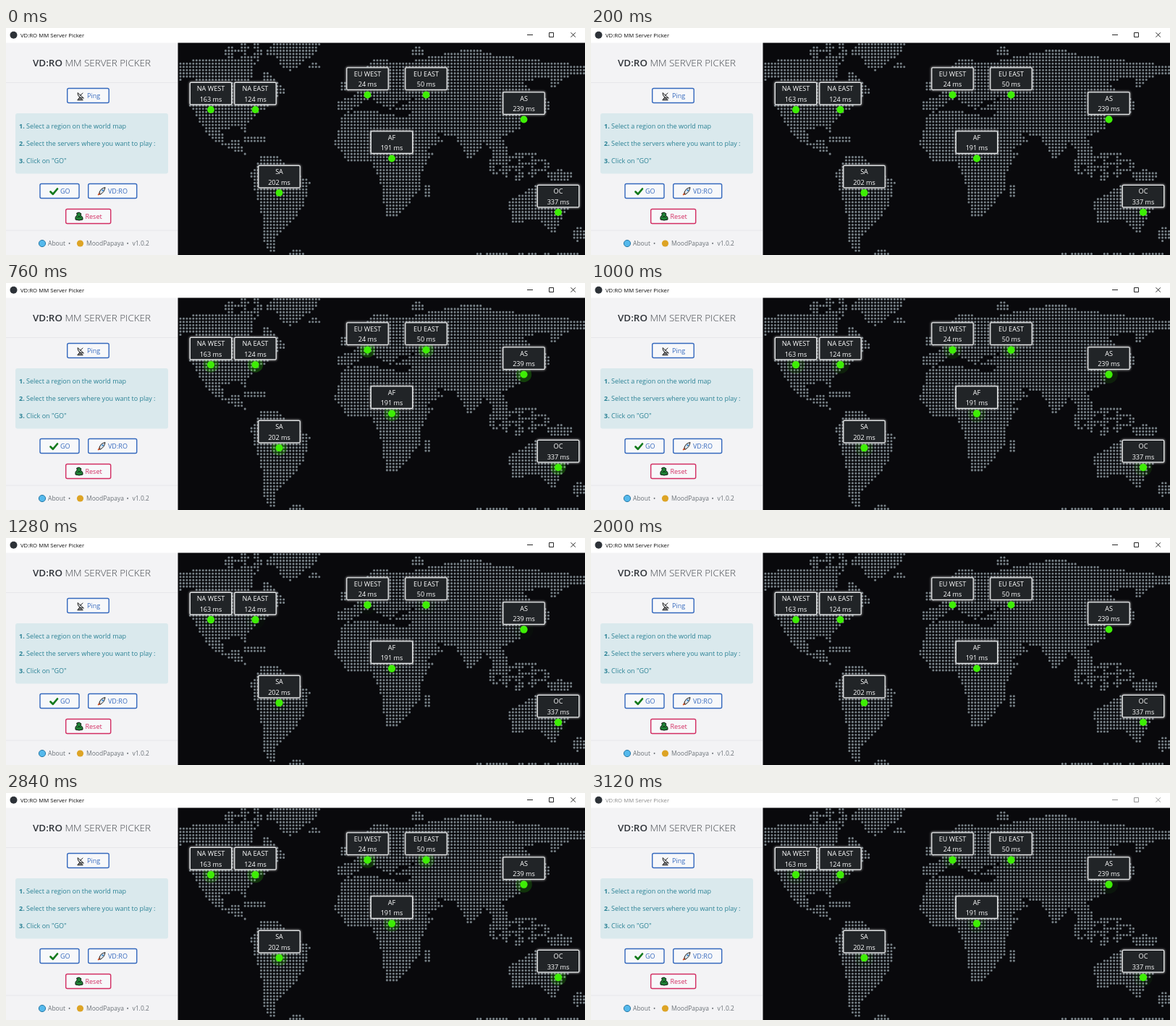
Write an HTML page that moves like this. It is 800 px wide and 314 px high and loops after 3.16 s.

```html
<!DOCTYPE html>
<html lang="en">
<head>
<meta charset="utf-8">
<title>Server Picker</title>
<style>
html, body { margin: 0; width: 100%; height: 100%; overflow: hidden; background: #09090c; }
svg { display: block; font: 9px "Open Sans", "Noto Sans", sans-serif; }
.btn rect { fill: #f7f8fa; stroke: currentColor; stroke-width: 1.4; }
.btn text { fill: currentColor; }
.label text { fill: #fff; font-size: 9.1px; font-weight: 500; text-anchor: middle; }
.foot { fill: #6c7278; font-size: 8.5px; }
.info { fill: #2b8295; }
.info tspan { font-weight: 700; }
</style>
</head>
<body>
<svg width="800" height="314" viewBox="0 0 800 314">
  <defs>
    <filter id="glow" x="-20%" y="-30%" width="140%" height="160%"><feGaussianBlur stdDeviation="1.7"/></filter>
  </defs>
  <rect width="800" height="314" fill="#09090c"/>
  <path id="land" fill="none" stroke="#757f85" stroke-width="3.1" stroke-linecap="round"/>
  <g id="servers"></g>

  <rect y="20" width="237.5" height="294" fill="#f3f3f5"/>
  <path d="M0 75.5H237M0 280H237" stroke="#e7e7ea"/>
  <text x="37" y="52.6" font-size="13.4" font-weight="300" fill="#44484d"><tspan font-weight="600" fill="#30343a">VD:RO</tspan> MM SERVER PICKER</text>
  <rect x="13" y="118" width="211" height="83.5" rx="3" fill="#dae9ed"/>
  <g class="info">
    <text x="18" y="139.2"><tspan>1.</tspan> Select a region on the world map</text>
    <text x="18" y="163"><tspan>2.</tspan> Select the servers where you want to play :</text>
    <text x="18" y="186.8"><tspan>3.</tspan> Click on "GO"</text>
  </g>
  <g id="buttons"></g>

  <!-- button icons: dish, check, rocket, bag -->
  <g stroke="#222" stroke-linejoin="round" stroke-linecap="round">
    <path d="M99 99.5l3-4 4 4z" fill="#777"/>
    <path d="M99 90q0 7 8 7zM103 93l3-3" fill="#d5d8da"/>
    <path d="M61.5 226.500l3.300 3.300 6.200-7.300" fill="none" stroke="#147a1c" stroke-width="2.700"/>
    <path d="M129 228l-2 3 3-1z" fill="#e66b23" stroke="#c7431c"/>
    <path d="M129 228q1-6 8-7.500-1 7-6.500 9.500z" fill="#dfe5ea"/>
    <circle cx="133.5" cy="224.500" r="1.300" fill="#3f8ed4" stroke="none"/>
    <path d="M98 256l3-1 3 2-1 2q4 2 3 6-5 2-10 0-1-4 2-6zM99 262q2-3 4 0" fill="#208336" stroke="#101812"/>
  </g>

  <circle cx="50" cy="298" r="4.600" fill="#55b9ec" stroke="#2878a6"/>
  <circle cx="102.500" cy="298" r="4.600" fill="#dda426"/>
  <g class="foot">
    <text x="58" y="301">About</text><text x="86" y="301">•</text>
    <text x="111" y="301">MoodPapaya</text><text x="166.500" y="301">•</text><text x="174.500" y="301">v1.0.2</text>
  </g>

  <rect width="800" height="20.500" fill="#fff"/>
  <circle cx="10.500" cy="9.800" r="5" fill="#2d3238"/>
  <g id="bar">
    <text x="20" y="12.700" font-size="7.750" fill="currentColor">VD:RO MM Server Picker</text>
    <path d="M720 9.500h8M750.500 6.500h6v6h-6zM780.500 6.300l6.400 6.400m0-6.400l-6.400 6.400" fill="none" stroke="currentColor" stroke-width=".9"/>
  </g>
</svg>
<script>
const LOOP = 3160, PULSE = 2000, START = 200, PITCH = 4.46;
const $ = id => document.getElementById(id);

// Key points of each coast
const continents = [
  "240 48 268 42 345 45 338 74 352 77 358 56 388 86 335 131 333 146 322 136 297 141 303 159 320 153 330 174 346 181 322 172 284 155 254 108 262 70 240 72",
  "360 28 372 21 434 21 426 36 392 62 378 48",
  "337 203 352 178 376 178 395 197 421 213 410 250 375 288 372 312 358 306 352 250",
  "466 118 500 113 555 124 577 171 592 171 572 202 573 222 541 262 525 262 516 208 504 184 472 185 454 160",
  "458 113 459 99 475 97 490 84 490 62 512 41 545 49 645 27 680 38 802 52 802 64 770 68 756 88 750 68 716 74 727 90 710 106 714 136 686 152 694 168 682 190 662 158 641 184 622 152 592 144 606 156 576 172 556 134 558 116 534 113 565 97 540 103 530 114 504 97 472 117",
  "694 240 732 217 748 224 758 216 778 248 757 284 734 265 698 270"
].map(points => new Path2D(`M${points}z`));

// Island groups: centre and radii; the larger ones are broken up by straits
const islands = [
  [336, 34, 34, 13], [426, 53, 9, 4], [470, 80, 9, 7], [568, 32, 10, 6], [745, 106, 6, 11],
  [582, 225, 5, 11], [708, 190, 42, 20], [765, 204, 19, 8], [344, 154, 18, 5], [791, 285, 9, 10],
  [402, 312, 12, 5], [715, 315, 95, 5]
];
const strait = (x, y) => Math.sin(x * .33) + Math.sin(y * .45 + x * .12) < -.3;
const isIsland = (x, y) => islands.some(([cx, cy, rx, ry]) =>
  Math.hypot((x - cx) / rx, (y - cy) / ry) < 1 && !(rx > 30 && strait(x, y)));

const pen = document.createElement("canvas").getContext("2d");
let dots = "";
for (let y = 22.5; y < 316; y += PITCH)
  for (let x = 241; x < 802; x += PITCH)
    if (isIsland(x, y) || continents.some(c => pen.isPointInPath(c, x, y)))
      dots += `M${x.toFixed(2)} ${y.toFixed(2)}h0`;
$("land").setAttribute("d", dots);

const servers = [
  ["NA WEST", 163, 283, 113], ["NA EAST", 124, 344.5, 113], ["EU WEST", 24, 499.5, 92.5],
  ["EU EAST", 50, 580.5, 92.5], ["AS", 239, 715.5, 126.5], ["AF", 191, 533, 180.5],
  ["SA", 202, 377.5, 228], ["OC", 337, 763, 255]
];
const box = 'x="-28.7" y="-37.7" width="57.4" height="30.6" rx="1.5"';
$("servers").innerHTML = servers.map(([name, ping, x, y]) => `
  <g class="label" transform="translate(${x} ${y})">
    <circle class="ring" fill="#3cff0a"/><circle class="dot" fill="#3eee05"/>
    <rect ${box} fill="#fff" stroke="#fff" stroke-width="2" opacity=".65" filter="url(#glow)"/>
    <rect ${box} fill="#212427" stroke="#e6e8e9" stroke-width="1.3"/>
    <text y="-25.6">${name}</text><text y="-11.3">${ping} ms</text>
  </g>`).join("");

const blue = "#3468bd", red = "#d22d62";
$("buttons").innerHTML = [
  ["Ping", 84.7, 83.5, 57.5, 112, blue], ["GO", 47, 215.5, 54, 75, blue],
  ["VD:RO", 113.7, 215.5, 67, 141, blue], ["Reset", 82.7, 250.5, 62, 109.5, red]
].map(([text, x, y, w, tx, color]) => `<g class="btn" color="${color}">
    <rect x="${x}" y="${y}" width="${w}" height="20" rx="2"/><text x="${tx}" y="${y + 13.6}">${text}</text>
  </g>`).join("");

// The CSS "ease" curve, solved by bisection
function ease(p) {
  let lo = 0, hi = 1, s, r;
  for (let i = 0; i < 20; i++) {
    s = (lo + hi) / 2;
    r = 1 - s;
    if (.75 * s * r + s ** 3 < p) lo = s; else hi = s;
  }
  return .3 * s * r * r + 3 * s * s * r + s ** 3;
}

const rings = document.querySelectorAll(".ring"), cores = document.querySelectorAll(".dot");
function draw(now) {
  const t = Math.floor(now % LOOP / 40) * 40;
  const phase = (t - START + PULSE) % PULSE / PULSE;
  const growing = phase < .7;
  const e = growing ? ease(phase / .7) : 1 - ease((phase - .7) / .3);
  const scale = .95 + .05 * e;
  cores.forEach(c => c.setAttribute("r", 5.2 * scale));
  rings.forEach(c => {
    c.setAttribute("r", (5.2 + 8.3 * e) * scale);
    c.setAttribute("opacity", growing ? .7 * (1 - e) : 0);
  });
  // The window loses focus at the end
  $("bar").setAttribute("color", t >= 3080 ? "#8c8c8c" : "#111");
  requestAnimationFrame(draw);
}
requestAnimationFrame(draw);
</script>
</body>
</html>
```
